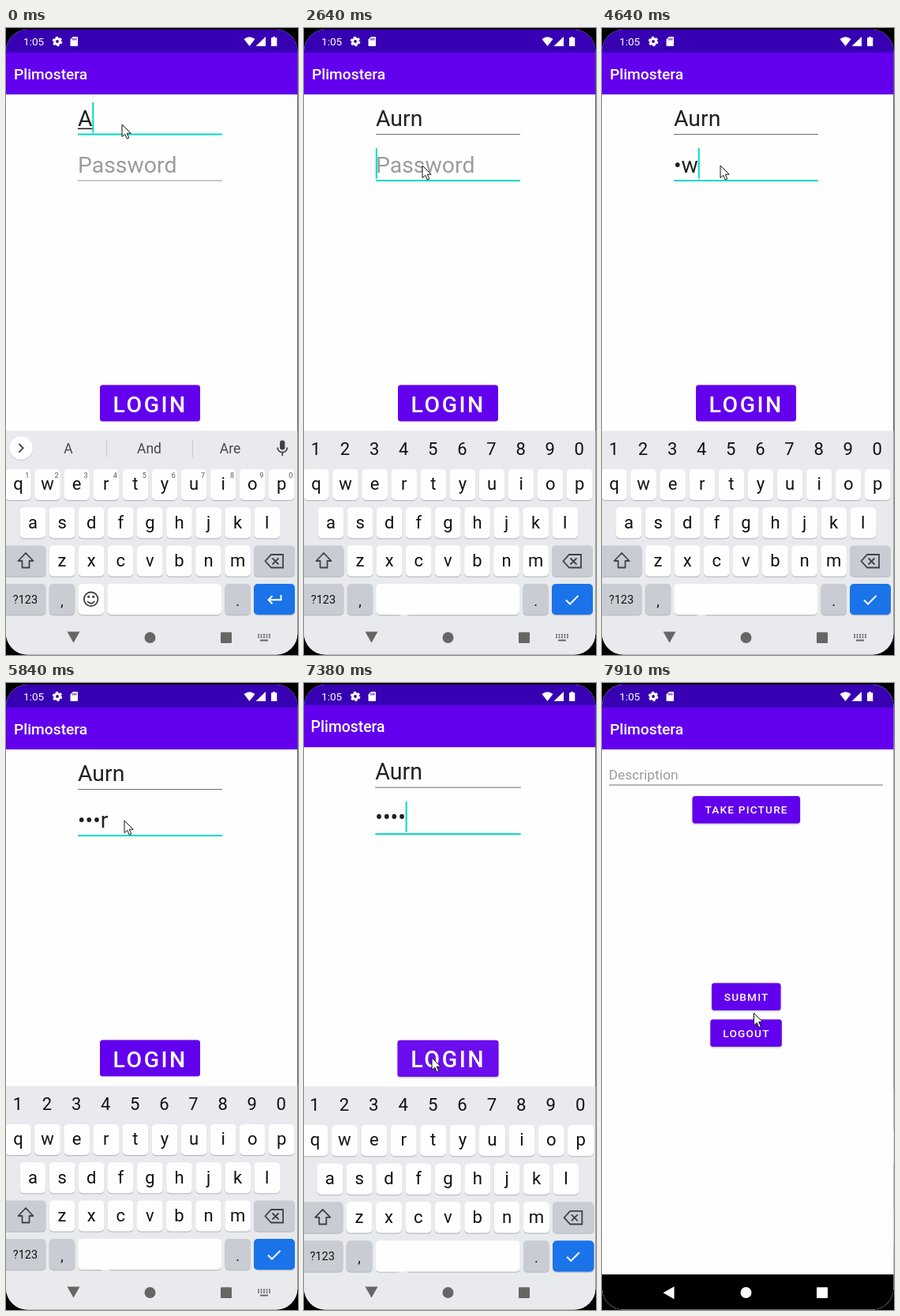
Recreate the animation shown at these times as an HTML page. Size 370 px wide and 793 px high, loop 8000 ms.

```html
<!DOCTYPE html>
<html lang="en">
<head>
<meta charset="utf-8">
<title>Login</title>
<style>
html, body { margin: 0; width: 100%; height: 100%; overflow: hidden; background: #000; }
svg { display: block; width: 370px; height: 793px; font-family: Roboto, sans-serif; }
text { white-space: pre; }
.mid { text-anchor: middle; }
.title { font-size: 19.2px; font-weight: 500; fill: #fff; }
.field { font-size: 28.4px; fill: #212121; }
.hint { fill: #9c9c9c; }
.btn { fill: #fff; font-weight: 500; letter-spacing: .0892em; }
.key { font-size: 22px; fill: #111; }
.sugg { font-size: 17.5px; fill: #44474b; }
.sup { font-size: 9px; fill: #55585c; }
.line { fill: none; stroke: #3f4246; stroke-width: 1.8; }
.raised { filter: drop-shadow(0 1px 1px rgba(0,0,0,.3)); }
.pressed { filter: drop-shadow(0 3px 2px rgba(0,0,0,.3)); }
</style>
</head>
<body>
<svg viewBox="0 0 370 793">
  <defs>
    <clipPath id="frame"><rect y="2" width="369.4" height="790.5" rx="27"/></clipPath>
    <clipPath id="btnClip"><rect x="119" y="451.5" width="127" height="46" rx="3.5"/></clipPath>
    <radialGradient id="glow">
      <stop offset="0" stop-color="#fff"/>
      <stop offset=".55" stop-color="#fff" stop-opacity=".8"/>
      <stop offset="1" stop-color="#fff" stop-opacity="0"/>
    </radialGradient>
    <g id="bars">
      <rect width="370" height="793" fill="#fefefe"/>
      <rect width="370" height="31.5" fill="#3700b3"/>
      <rect y="31" width="370" height="53" fill="#6200ee"/>
      <text class="title" x="10" y="65">Plimostera</text>
    </g>
  </defs>

  <g clip-path="url(#frame)">
    <g id="login">
      <use href="#bars"/>
      <text id="name" class="field" x="91" y="124"></text>
      <rect id="compose" x="91" y="126.5" height="1.6" fill="#212121"/>
      <rect id="line1" x="91" width="183"/>
      <text id="hint" class="field hint" x="91" y="182.5">Password</text>
      <text id="pass" class="field" x="91" y="182.5"></text>
      <rect id="line2" x="91" width="183"/>
      <rect id="caret" width="2" height="38.5" fill="#03dac5"/>

      <g id="loginBtn"><rect x="119" y="451.5" width="127" height="46" rx="3.5" fill="#6200ee"/></g>
      <g clip-path="url(#btnClip)"><circle id="ripple" cx="168" cy="474" fill="url(#glow)"/></g>
      <text class="btn mid" x="182.7" y="486" font-size="28.4">LOGIN</text>

      <g id="keyboard">
        <rect y="509.5" width="370" height="300" fill="#e8eaed"/>
        <g id="keys"></g>
        <g id="textMode">
          <circle cx="19" cy="532" r="15" fill="#bfc2c6"/>
          <circle cx="19" cy="531.3" r="14.8" fill="#fff"/>
          <path class="line" d="M16.5 526l5.2 5.3-5.2 5.3"/>
          <path d="M127.5 520v23M236.5 520v23" stroke="#c6c9cd"/>
          <g id="suggest" class="sugg mid"></g>
          <rect x="347" y="521.5" width="6.4" height="12" rx="3.2" fill="#3f4246"/>
          <path class="line" d="M344 530.5a6.2 6.2 0 0 0 12.4 0M350.2 537v4"/>
          <g id="sups" class="sup mid"></g>
          <circle class="line" cx="107.7" cy="722.3" r="8.8"/>
          <path class="line" d="M103 725q4.700 5.500 9.400 0"/>
          <path d="M103.300 719.400h2.800m3.200 0h2.800" stroke="#3f4246" stroke-width="2.600"/>
          <path d="M348.500 717v6.200h-16m5-5l-5 5 5 5" fill="none" stroke="#fff" stroke-width="2"/>
        </g>
        <g id="passMode">
          <g id="digits" class="key mid"></g>
          <path d="M332 723.500l5 5 10.500-10.500" fill="none" stroke="#fff" stroke-width="2"/>
        </g>
        <path class="line" d="M25 664l-9.500 10h5v8.500h9v-8.500h5z" stroke-linejoin="round"/>
        <path class="line" d="M336 666h15v16.500h-15l-7.500-8.250zM337.500 670.500l8 8m0-8l-8 8"/>
      </g>
    </g>

    <g id="post">
      <use href="#bars"/>
      <text x="8.500" y="122" class="hint" font-size="17.4">Description</text>
      <rect x="9" y="128.300" width="347" height="1.400" fill="#9a9a9a"/>
      <g id="postBtns"></g>
    </g>

    <rect id="navBg" y="748" width="370" height="45"/>
    <g id="nav">
      <path id="back" d="M77.500 764h16l-8 13.500z"/>
      <circle cx="182.500" cy="771" r="7"/>
      <rect x="272" y="764.300" width="14" height="13.700" rx="1"/>
      <g id="kbdIcon">
        <path d="M319 767.500h16M319 770.500h16" stroke="#666" stroke-width="1.800" stroke-dasharray="2 1.500"/>
        <path d="M322 774.500h10" stroke="#666" stroke-width="1.800"/>
      </g>
    </g>

    <g fill="#fff">
      <text x="22" y="22" font-size="13.600">1:05</text>
      <circle cx="65" cy="17" r="3.400" fill="none" stroke="#fff" stroke-width="3"/>
      <circle cx="65" cy="17" r="5.300" fill="none" stroke="#fff" stroke-width="2" stroke-dasharray="3 2.550"/>
      <path d="M85 11h5q1 0 1 1v10q0 1-1 1h-7.500q-1 0-1-1v-7.500z"/>
      <path d="M84.800 13v2.500m2-2.500v2.500m2-2.500v2.500" stroke="#3700b3"/>
      <path d="M301.500 14q7-5.500 14 0l-7 9z"/>
      <path d="M329 11v12h-12.500z"/>
      <path d="M338 11h3v1.300h2.300v10.700h-7.300v-10.700h2z"/>
    </g>
  </g>
  <path id="mouse" d="M0 0V15.500L3.700 12.200L6.300 18L8.800 16.900L6.200 11.200H11.200Z" fill="#fff" stroke="#111" stroke-width="1"/>
</svg>

<script>
const $ = id => document.getElementById(id);
const LOOP = 8000, PITCH = 37.1;
const TEAL = '#03dac5', GREY = '#c9cdd3';

function add(parent, tag, attrs, text = '') {
  const el = document.createElementNS('http://www.w3.org/2000/svg', tag);
  for (const k in attrs) el.setAttribute(k, attrs[k]);
  el.textContent = text;
  return parent.appendChild(el);
}

function set(id, attrs) {
  for (const k in attrs) $(id).setAttribute(k, attrs[k]);
}

function show(id, on) {
  $(id).style.display = on ? '' : 'none';
}

function addKey(x, y, w, fill = '#fefefe') {
  const box = { x, width: w, height: 39, rx: 5 };
  add($('keys'), 'rect', { ...box, y: y + 1.2, fill: '#b9bdc3' });
  return add($('keys'), 'rect', { ...box, y, fill });
}

function label(x, y, text, size = 22) {
  add($('keys'), 'text', { x, y, class: 'key mid', style: `font-size:${size}px` }, text);
}

function buildKeyboard() {
  [['qwertyuiop', 15.4, 558], ['asdfghjkl', 34, 606.3], ['zxcvbnm', 71, 654.5]].forEach(([row, x0, y]) =>
    [...row].forEach((ch, i) => {
      const x = x0 + i * PITCH;
      addKey(x - 16.3, y, 32.6);
      label(x, y + 26.3, ch);
    }));
  for (let i = 0; i < 10; i++) {
    const x = 15.4 + i * PITCH, d = (i + 1) % 10;
    add($('sups'), 'text', { x: x + 11.5, y: 569 }, d);
    add($('digits'), 'text', { x: x - .5, y: 540 }, d);
  }
  addKey(-6, 654.5, 56.5, GREY);
  addKey(314, 654.5, 52, GREY);
  addKey(-6, 703, 56.5, GREY);
  addKey(54.7, 703, 32.6, GREY);
  addKey(91.5, 703, 32.6);
  addKey(128.3, 703, 144.7).id = 'space';
  addKey(277.3, 703, 32.6, GREY);
  addKey(314, 703, 52, '#1a73e8');
  label(24.5, 728, '?123', 14.5);
  label(71, 731, ',', 18);
  label(293.5, 731, '.', 18);
  [79, 181.5, 284].forEach(x => add($('suggest'), 'text', { x, y: 538 }));
}

function buildPostButtons() {
  [['TAKE PICTURE', 114.5, 143, 136.5], ['SUBMIT', 139, 379.5, 87.5], ['LOGOUT', 137.3, 425.5, 90.5]]
    .forEach(([text, x, y, w]) => {
      add($('postBtns'), 'rect', { x, y, width: w, height: 34.5, rx: 3.5, fill: '#6200ee', class: 'raised' });
      add($('postBtns'), 'text', { x: x + w / 2 + .4, y: y + 22.2, class: 'btn mid', 'font-size': 13.6 }, text);
    });
}

// Each step overrides part of the state from its time on.
const steps = [
  [0, { name: 'A', under: 1, words: 'A And Are', pass: '', caret: 1, focus: 1, secret: 0,
        mouse: [147, 122], ripple: [0, 0], press: 0, zoom: 1, post: null }],
  [430, { caret: 0 }],
  [830, { name: 'Au', caret: 1 }],
  [1100, { name: 'Aur', under: 2, words: 'Au Aunt Aug' }],
  [1350, { under: 3, words: 'Aur Aura Aural' }],
  [1630, { name: 'Aurn' }],
  [1780, { under: 4, words: 'Aurn Aura Auto' }],
  [2240, { caret: 0, mouse: [149.5, 168] }],
  [2390, { under: 0, focus: 2, caret: 1, mouse: [150, 174] }],
  [2510, { secret: 1 }],
  [3160, { caret: 0 }],
  [3720, { caret: 1 }],
  [3840, { pass: 'A' }],
  [4270, { caret: 0 }],
  [4640, { pass: '•w', caret: 1 }],
  [4890, { pass: '••t' }],
  [5280, { pass: '•••r' }],
  [5840, { caret: 0 }],
  [5970, { mouse: [182, 360] }],
  [6120, { mouse: [164, 420] }],
  [6270, { caret: 1, mouse: [162, 458] }],
  [6400, { mouse: [162, 474] }],
  [6520, { caret: 0 }],
  [6810, { pass: '••••', ripple: [42, .24], press: 1 }],
  [6960, { ripple: [90, .18] }],
  [7230, { ripple: [180, .08] }],
  [7380, { caret: 1, press: 0, zoom: 1.008, ripple: [180, .06] }],
  [7530, { zoom: 1.06, post: [.94, .85] }],
  [7650, { post: [.985, 1] }],
  [7770, { post: [1, 1] }],
  [7910, { mouse: [192.5, 417.5] }]
];

const scaleAt = (s, x, y) => `translate(${x} ${y}) scale(${s}) translate(${-x} ${-y})`;

function underline(id, y, on, idle) {
  set(id, { y: on ? y - 1 : y - .5, height: on ? 2 : 1, fill: on ? TEAL : idle });
}

function draw(s) {
  $('name').textContent = s.name;
  $('pass').textContent = s.pass;
  show('hint', !s.pass);
  set('compose', { width: s.under ? $('name').getSubStringLength(0, s.under) : 0 });
  underline('line1', 134.5, s.focus === 1, '#6e6e6e');
  underline('line2', 193, s.focus === 2, '#9a9a9a');

  const active = $(s.focus === 1 ? 'name' : 'pass');
  const typed = active.textContent ? active.getComputedTextLength() : 0;
  set('caret', { x: 91 + typed - .2, y: s.focus === 1 ? 94 : 152 });
  show('caret', s.caret);

  s.words.split(' ').forEach((w, i) => { $('suggest').children[i].textContent = w; });
  show('textMode', !s.secret);
  show('passMode', s.secret);
  set('space', s.secret ? { x: 91.5, width: 181.5 } : { x: 128.3, width: 144.7 });

  set('ripple', { r: s.ripple[0], opacity: s.ripple[1] });
  set('loginBtn', { class: s.press ? 'pressed' : s.zoom > 1 ? 'raised' : '' });
  set('login', { transform: scaleAt(s.zoom, 182.5, 434) });

  show('post', s.post);
  if (s.post) set('post', { transform: scaleAt(s.post[0], 184.5, 397), opacity: s.post[1] });
  show('navBg', s.post);
  set('nav', { fill: s.post ? '#fff' : '#666' });
  set('back', { d: s.post ? 'M77.5 771.2l14-8v16z' : 'M77.5 763.5h16l-8 14z' });
  show('kbdIcon', s.zoom === 1);
  set('mouse', { transform: `translate(${s.mouse})` });
}

buildKeyboard();
buildPostButtons();

const start = performance.now();
let last = 0;
function tick() {
  const t = (performance.now() - start) % LOOP;
  const n = steps.filter(([at]) => at <= t).length;
  if (n !== last) {
    draw(Object.assign({}, ...steps.slice(0, n).map(step => step[1])));
    last = n;
  }
  requestAnimationFrame(tick);
}
tick();
</script>
</body>
</html>
```
